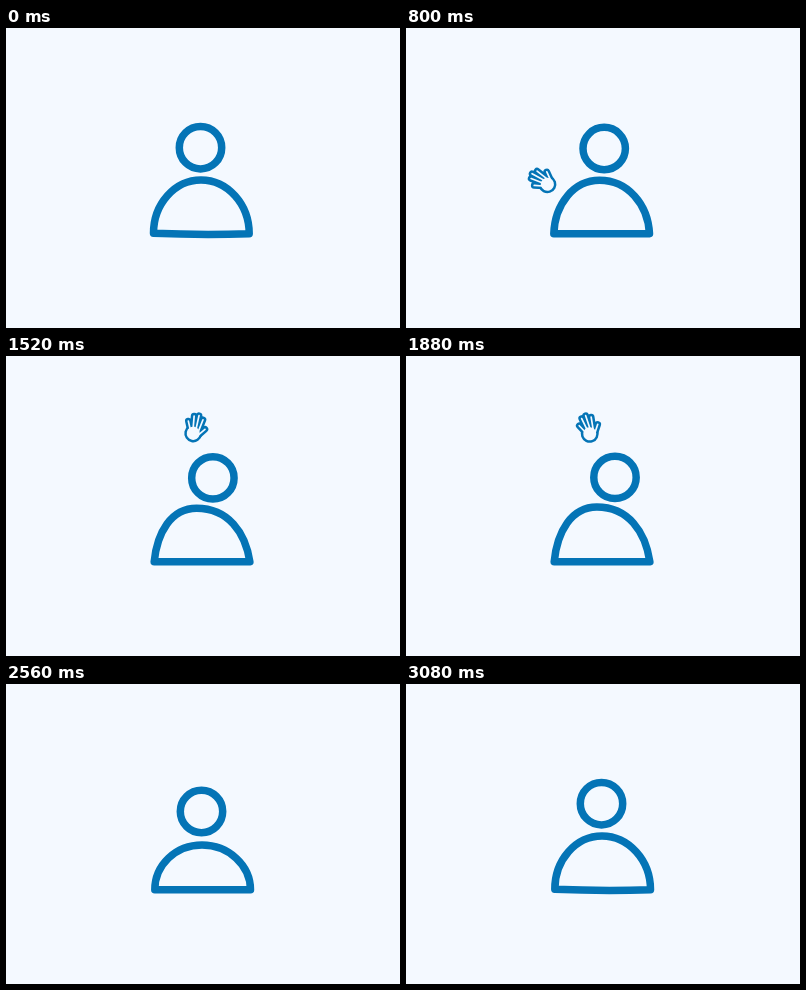
An HTML page with a canvas for the animation above (4 s loop, 394 by 300 pixels).

```html
<!DOCTYPE html>
<html lang="en">
<head>
<meta charset="utf-8">
<title>Waving person</title>
<style>
  html, body { margin: 0; width: 100%; height: 100%; overflow: hidden; background: #f4f9ff; }
  canvas { display: block; width: 394px; height: 300px; }
</style>
</head>
<body>
<canvas id="stage"></canvas>
<script>
const BG = '#f4f9ff', BLUE = '#0474b6';
const LOOP = 4000, STEP = 40, REST = 3080;
const RISE = 600, UP = 1120, DROP = 2280, HIDDEN = 2480;
const canvas = document.getElementById('stage');
const ctx = canvas.getContext('2d');
const dpr = window.devicePixelRatio || 1;
canvas.width = 394 * dpr;
canvas.height = 300 * dpr;

const mix = (a, b, u) => a + (b - a) * u;
const curve = (a, b, c, u) => mix(mix(a, b, u), mix(b, c, u), u);

// Eased 0 to 1 between two times.
function ramp(t, from, to) {
  const u = Math.min(1, Math.max(0, (t - from) / (to - from)));
  return u * u * (3 - 2 * u);
}

// Rises to 1 at the middle and falls back to 0.
const bump = (t, mid, half) => ramp(t, mid - half, mid) - ramp(t, mid, mid + half);

function poseAt(t) {
  const lean = ramp(t, RISE, UP) - ramp(t, DROP, 2560);
  const settle = lean * ramp(t, UP, 2200);
  const squash = 0.6 * bump(t, 200, 200) + bump(t, 2560, 280);
  const stretch = bump(t, 540, 160);
  const drift = ramp(t, 0, 2560);
  return {
    lean,
    left: 147.5 + drift * 1.3 - settle * 0.5,
    headX: 194.5 + drift + lean * 10.5 + settle * 4,
    headY: 119.7 + squash * 7.8 + lean * 2.5 - stretch * 4 - settle,
    topX: 195 + drift - lean * 5,
    topY: 152 + squash * 9 + lean - stretch * 2 - settle * 2.5,
    bow: 1 - ramp(t, 200, 480) + ramp(t, 2560, REST)
  };
}

function outline() {
  ctx.lineWidth = 7.5;
  ctx.strokeStyle = BLUE;
  ctx.fillStyle = BG;
  ctx.fill();
  ctx.stroke();
}

function handLayer(color, grow) {
  ctx.fillStyle = ctx.strokeStyle = color;
  ctx.lineWidth = 1.7 + 2 * grow;
  ctx.beginPath();
  for (let i = 0; i < 4; i++) {
    ctx.moveTo(-5.2 + 2.8 * i, 3);
    ctx.lineTo(-8.7 + 4.7 * i, -12.3 + 2.3 * (i - 1.8) ** 2);
  }
  ctx.moveTo(3, 8);
  ctx.lineTo(9.2, 0);
  ctx.stroke();
  ctx.beginPath();
  ctx.ellipse(-1.5, 6.2, 6.5 + grow, 6.6 + grow, 0, 0, Math.PI * 2);
  ctx.fill();
}

function drawHand(t) {
  if (t < RISE || t > HIDDEN) return;
  const up = ramp(t, RISE, UP), down = ramp(t, DROP, HIDDEN);
  const wave = 7 + 30 * Math.cos(2 * Math.PI * (t - 2200) / 850);
  const angle = mix(mix(-80, wave, up), 0, down);
  ctx.save();
  ctx.translate(mix(curve(175, 110, 186.3, up), 176, down),
                mix(curve(196, 140, 84, up), 196, down));
  ctx.rotate(angle * Math.PI / 180);
  ctx.translate(0, -13);
  ctx.rotate(-5 * Math.PI / 180);
  handLayer(BLUE, 2.5);
  handLayer(BG, 0);
  ctx.restore();
}

function drawBody({ left, topX, topY, lean, bow }) {
  const right = left + 95.7, base = 205.8;
  const rise = (base - topY) * 0.55, reach = 26.5 + 2 * lean;
  ctx.beginPath();
  ctx.moveTo(left, base - 0.5 * bow);
  ctx.bezierCurveTo(left + 3 * lean, base - rise, topX - reach + 3 * lean, topY, topX, topY);
  ctx.bezierCurveTo(topX + reach + 3 * lean, topY, right - 4.5 * lean, base - rise, right, base);
  ctx.quadraticCurveTo((left + right) / 2, base + 1.5 * bow, left, base - 0.5 * bow);
  ctx.closePath();
  outline();
}

function drawHead({ headX, headY }) {
  ctx.beginPath();
  ctx.arc(headX, headY, 21.2, 0, Math.PI * 2);
  outline();
}

function draw(t) {
  const pose = poseAt(t);
  ctx.setTransform(dpr, 0, 0, dpr, 0, 0);
  ctx.fillStyle = BG;
  ctx.fillRect(0, 0, 394, 300);
  ctx.lineCap = ctx.lineJoin = 'round';
  drawHand(t);
  drawBody(pose);
  drawHead(pose);
}

const start = performance.now();
function tick() {
  const t = (performance.now() - start) % LOOP;
  draw(Math.min(Math.floor(t / STEP) * STEP, REST));
  requestAnimationFrame(tick);
}
tick();
</script>
</body>
</html>
```
